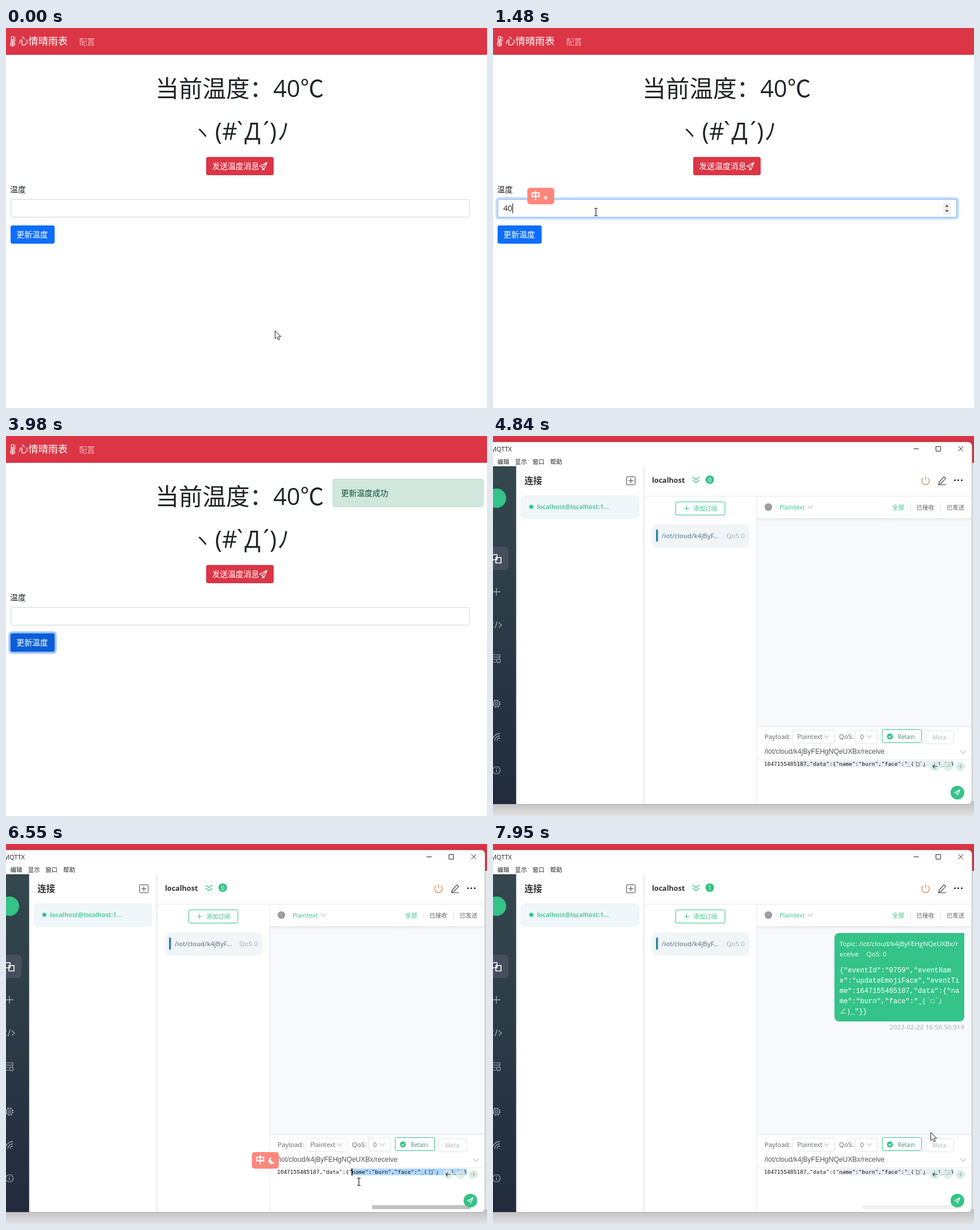
An HTML page that plays this animation: 841 px wide and 666 px high, repeating every 8 s.

```html
<!DOCTYPE html>
<html lang="zh-CN">
<head>
<meta charset="utf-8">
<style>
html, body { margin: 0; width: 100%; height: 100%; overflow: hidden; background: #fff; }
svg { display: block; width: 841px; height: 666px; }
text { font-family: 'Open Sans', 'Noto Sans CJK SC', 'Noto Sans CJK', sans-serif; white-space: pre; }
.mono { font-family: 'Liberation Mono', 'Noto Sans CJK SC', 'Noto Sans CJK', monospace; }
.code { font-family: 'DejaVu Sans Mono', 'Noto Sans CJK SC', 'Noto Sans CJK', monospace; }
.arial { font-family: 'Liberation Sans', sans-serif; }
</style>
</head>
<body>
<svg id="stage" viewBox="0 0 841 666"></svg>
<script>
const GREEN = '#34c388', INK = '#212529', LINE = '#e6e8f1';
const LOOP = 8000;

const text = (x, y, size, fill, str, extra = '') =>
  `<text x="${x}" y="${y}" font-size="${size}" fill="${fill}" ${extra}>${str}</text>`;
const mid = 'text-anchor="middle"', end = 'text-anchor="end"';
const rect = (x, y, w, h, fill, r = 0, extra = '') =>
  `<rect x="${x}" y="${y}" width="${w}" height="${h}" rx="${r}" fill="${fill}" ${extra}/>`;
const box = (x, y, w, h, stroke, r = 3, fill = '#fff') =>
  rect(x + .5, y + .5, w - 1, h - 1, fill, r, `stroke="${stroke}"`);
const dot = (x, y, r, fill, extra = '') =>
  `<circle cx="${x}" cy="${y}" r="${r}" fill="${fill}" ${extra}/>`;
const ring = (x, y, r, stroke, w, extra = '') =>
  dot(x, y, r, 'none', `stroke="${stroke}" stroke-width="${w}" ${extra}`);
const path = (d, stroke, w = 1, fill = 'none', extra = '') =>
  `<path d="${d}" stroke="${stroke}" stroke-width="${w}" fill="${fill}" ${extra}/>`;
const chevron = (x, y, stroke = '#b4b9c2') => path(`M${x - 4.5} ${y - 2.3}l4.5 4.6 4.5-4.6`, stroke, 1.1);
const group = (id, body) => `<g id="${id}">${body}</g>`;
const plane = (x, y, s, w, tail = '') => path('M12 0L0 6.3l4.600 1.700L6.800 12.300zM12 0L4.600 8' + tail,
  '#fff', w, 'none', `transform="translate(${x} ${y}) scale(${s})" stroke-linejoin="round"`);

function badge(id, mark) {
  return group(id, rect(0, 0, 47, 29, '#ff877c', 5) +
    text(6, 20, 17, '#fff', '中', 'font-weight="700"') + mark);
}

function webPage() {
  const face = [['(', 371.5], ['#', 391], ['`', 409], ['Д', 431], ['´', 455], [')', 467], ['ﾉ', 485]];
  return rect(0, 0, 841, 666, '#fff') +
    rect(0, 0, 841, 47, '#dc3545') +
    path('M9.2 25V17a2.3 2.3 0 0 1 4.6 0v8a3.8 3.8 0 1 1-4.6 0z', '#fff', 1.2) +
    path('M11.5 19v9', '#fff', 1.6) + dot(11.5, 28, 2, '#fff') + path('M15 16.5h2.5M15 19.5h2.5M15 22.5h2.5', '#fff') +
    text(22, 29, 17.2, '#fff', '心情晴雨表') +
    text(128, 28.5, 13.75, 'rgba(255,255,255,.6)', '配置') +
    text(261, 121, 41.25, INK, '当前温度：40℃') +
    text(343, 194, 31, INK, 'ヽ', mid) +
    face.map(([c, x]) => text(x, 196, 41.25, INK, c, mid)).join('') +
    rect(350, 226, 118, 32, '#dc3545', 3.4) +
    text(360.3, 246.5, 13.75, '#fff', '发送温度消息') + plane(443.5, 235.5, 1.08, 1, 'V12.500l1.500-2.200') +
    text(7, 287.5, 13.75, INK, '温度') +
    group('ring', rect(4.5, 296.5, 810, 39, '#c2dbfe', 6)) +
    box(8, 300, 803, 32, '#ced4da', 3.4) +
    group('focus', box(8, 300, 803, 32, '#86b7fe', 3.4) + rect(787, 306, 13, 20, '#efefef') +
      path('M790.5 313.5l3-4 3 4zM790.5 319l3 4 3-4z', 'none', 0, '#505050')) +
    `<text id="typed" x="18" y="321" font-size="13.75" fill="${INK}"></text>` +
    rect(19, 307.5, 1, 17, '#000', 0, 'id="caret"') +
    group('btnRing', rect(4.5, 342.5, 84, 39, '#98c1fe', 6)) +
    rect(8, 346, 77, 32, '#0d6efd', 3.4, 'id="btn"') +
    text(18.3, 366.5, 13.75, '#fff', '更新温度') +
    group('toast', box(571, 75, 264, 49.5, '#badbcc', 3.4, '#d1e7dd') +
      text(585.7, 104.5, 13.75, '#0f5132', '更新温度成功')) +
    badge('ime', ring(32, 17.5, 2.2, '#fff', 1.5));
}

function sidebar() {
  const c = '#a4abb3';
  return rect(0, 53, 40.5, 592, 'url(#side)') + dot(6, 109, 17, GREEN) + rect(-8, 194, 35, 41, '#474f5c', 6) +
    path('M-1 208h8v9h-8zM5 213h9v9.500h-9z', '#fff', 1.6) +
    path('M-1 273h14M6 266v14', c, 1.3) +
    path('M1 327l-5 4.500 5 4M10 327l5 4.500-5 4M7.500 325l-4 12', c, 1.3) +
    path('M5 396.500h-6v-13h13v6M-1 387.500h13M-1 391.500h6', c, 1.2) + ring(9.5, 394, 3.3, c, 1.2) +
    ring(6, 469, 6.4, c, 1.4, 'stroke-dasharray="2.800 2.226"') +
    ring(6, 469, 5.2, c, 1) + ring(6, 469, 2.2, c, 1.1) +
    path('M12 521.500a13 13 0 0 0-13 12.500M12 525.500a9 9 0 0 0-9 8.500M12 529.500a5 5 0 0 0-5 4.500', c, 1.3) +
    ring(6, 586, 6.5, c, 1.2) + path('M6 585v4.500M6 582v1.500', c, 1.3);
}

function message() {
  const lines = ['{"eventId":"0759","eventNam', 'e":"updateEmojiFace","eventTi',
    'me":1647155485187,"data":{"na', 'me":"burn","face":"_(´□`」', '∠)_"}}'];
  return path('M605 156H824V303a8 8 0 0 1-8 8H605a8 8 0 0 1-8-8V164a8 8 0 0 1 8-8z', 'none', 0, GREEN) +
    text(606, 178.5, 11.5, '#fff', 'Topic: /iot/cloud/k4jByFEHgNQeUXBx/r') +
    text(606, 196.5, 11.5, '#fff', 'eceive') + text(653, 196.5, 11.5, '#fff', 'QoS: 0') +
    lines.map((s, i) => text(606, 225 + 18 * i, 12.03, '#fff', s, 'class="mono"')).join('') +
    text(824, 325, 11.45, '#a2a9b0', '2023-02-22 16:56:50:919', end);
}

function client() {
  const grey = '#606266', dark = '#333';
  const menu = [['编辑', 7.5], ['显示', 38.5], ['窗口', 69], ['帮助', 100]];
  const round = (x, o) => dot(x, 579, 8.3, '#d5ebe2', `opacity="${o}"`);
  return rect(0, 10, 841, 37, '#d03343') + rect(837, 47, 4, 619, '#e4e4e4') +
    rect(0, 640, 841, 26, 'url(#floor)') + rect(0, 6, 841, 5, '#d03343') +
    rect(-12, 10.5, 849.5, 635, '#fff', 7, 'stroke="#8d8d8d" stroke-width=".6"') +
    text(-4, 26.5, 11, '#222', 'MQTTX') +
    path('M735.500 22.500h9M774.500 18.500h8v8h-8zM813.500 18l8.500 8.500M822 18l-8.500 8.500', '#222') +
    menu.map(([s, x]) => text(x, 48.5, 10.4, '#222', s)).join('') + sidebar() +
    // connections
    text(55, 84, 15.5, dark, '连接', 'font-weight="700"') +
    box(233, 71, 16, 15, '#444', 1) + path('M236.500 78.500h9M241 74v9', '#444', 1.1) +
    rect(48, 104, 208, 41, '#eff7fa', 6) + dot(67, 124, 3.6, GREEN) +
    text(77, 127.5, 11.1, GREEN, 'localhost@localhost:1...', 'font-weight="600"') +
    rect(260, 53, 5, 592, 'url(#edge)') +
    // header
    path('M265 105.500H837M461.500 105V645', LINE) +
    text(278, 81.5, 12.6, dark, 'localhost', 'font-weight="700"') +
    path('M349 72l6 4 6-4M349 77.500l6 4 6-4', GREEN, 1.5) + dot(379, 76.5, 7.6, GREEN) +
    `<text id="count" x="379" y="80.500" font-size="10.500" fill="#fff" ${mid}></text>` +
    path('M752.500 73a6.700 6.700 0 1 0 7.500 0M756.300 70.500v7.500', '#dd9152', 1.3) +
    path('M780 81l8.500-9.500 3 2.800-8.500 9.200-3.700.9zM778.500 85.500h13.500', '#444', 1.2) +
    [807.5, 813.5, 819.5].map(x => dot(x, 77.5, 1.6, '#333')).join('') +
    // subscriptions
    box(319, 115, 87, 24, GREEN, 2) + path('M334 127h9M338.500 122.500v9', GREEN) +
    text(350.3, 130.5, 10.4, GREEN, '添加订阅') +
    rect(278, 155, 170, 40.5, '#f0f5f8', 7) + rect(285, 164, 3.5, 21, '#3182ab', 1) +
    text(295, 178.5, 11.6, '#4e6a7c', '/iot/cloud/k4jByF...') + text(408, 178.5, 11.6, '#a2a9b0', 'QoS 0') +
    // messages
    rect(462, 145, 375, 363, '#f8f9fc') + rect(462, 144, 375, 5, 'url(#drop)') +
    dot(481.5, 124.5, 6.6, '#9a9da4') + text(481.5, 128, 9, '#b5b8bd', '?', mid) +
    text(501, 128.5, 10.9, GREEN, 'Plaintext') + chevron(555, 124.5) +
    text(698, 129, 10.4, GREEN, '全部') + text(740, 129, 10.4, grey, '已接收') + text(793, 129, 10.4, grey, '已发送') +
    path('M730.500 120v11M782.500 120v11', '#dcdfe6') +
    group('msg', message()) +
    // publish form
    path('M462 508.500H837', '#dddfe3') +
    text(475, 530.5, 11.5, grey, 'Payload:') + box(523, 515, 75, 24, '#e0e3e9') +
    text(532, 530.5, 10.8, grey, 'Plaintext') + chevron(583, 527) +
    text(605, 530.5, 11.5, grey, 'QoS:') + box(633, 515, 40, 24, '#e0e3e9') +
    text(642, 530.5, 10.8, grey, '0') + chevron(658, 527) +
    box(680, 514, 70, 24, GREEN, 2) + dot(694, 526.5, 5.2, GREEN) + path('M691.500 526.500l2 2 3.300-3.600', '#fff', 1.2) +
    text(708, 530.5, 10, '#3f8f72', 'Retain') +
    box(755, 516, 51, 24, '#e0e3e9', 2) + text(780.5, 531.5, 10, '#c0c4cc', 'Meta', mid + ' font-weight="600"') +
    text(475, 557, 12.05, '#555', '/iot/cloud/k4jByFEHgNQeUXBx/receive', 'class="arial"') +
    chevron(822, 554) + path('M462 567.500H837', LINE) +
    // editor
    rect(531, 569, 275, 11.5, '#e5ebf1', 0, 'id="sel"') +
    text(474, 577.5, 9.47, '#111', '1647155485187,"data":{"name":"burn","face":"_(´', 'class="code"') +
    text(740, 577.5, 9.47, '#111', '□`」', 'class="code"') +
    text(806, 577.5, 9.47, '#111', ')_"}}', 'class="code" ' + end) +
    round(773, .85) + round(795, .8) + round(817, .8) +
    path('M777 579h-8M772.500 575.500l-3.500 3.500 3.500 3.500', '#333', 1.1) +
    path('M791.500 579h7M813 579h7M816.500 575.500l3.500 3.500-3.500 3.500', '#a3b8ae', 1.1) +
    rect(604, 568.5, 1.6, 12.5, '#000', 0, 'id="edCaret"') +
    rect(640, 633, 172, 7, '#c1c1c1', 0, 'id="bar"') +
    dot(812, 625, 12, GREEN) + plane(806.8, 619.8, .82, 1.25) +
    badge('ime2', path('M34 9.500a5.600 5.600 0 1 0 5.500 8a5.200 5.200 0 0 1-5.500-8z', 'none', 0, '#fff'));
}

const cursors =
  group('arrow', path('M.5.5V14.8l3.300-3.100 2.400 5 2.300-1-2.300-4.900h4.500z', '#222', 1, '#fff')) +
  group('beam', path('M-3-6.500h2.300l.7.700.7-.7H3M0-6V6M-3 6.500h2.300l.7-.7.700.7H3', '#222', 1.2)) +
  group('hand', path('M1 1.800a1.500 1.500 0 0 1 3 0V7l1.800.300 1.800.500 1.800.600c1.300.400 1.600 1 1.600 2.200 0 3-1 4-1.300 5.500V18H3.500v-1.600C2 14.500-1 11.500-2.500 9.800c-.8-1.400.8-2.300 1.900-1.400L1 10z', '#222', 1, '#fff') +
    path('M4 7v3M6.700 7.800v2.500M9.300 8.600v2', '#222', .8));

const grad = (id, a, b, dir) => `<linearGradient id="${id}" x2="${dir ? 0 : 1}" y2="${dir ? 1 : 0}">` +
  `<stop stop-color="${a}"/><stop offset="1" stop-color="${b}"/></linearGradient>`;

document.getElementById('stage').innerHTML =
  '<defs>' + grad('side', '#34484e', '#212b3c', 1) + grad('floor', '#bdbdbd', '#e1e1e1', 1) +
  grad('edge', '#fff', '#e9ebef', 0) + grad('drop', '#e6e8ec', '#f8f9fc', 1) + '</defs>' +
  group('page', webPage()) + group('client', client()) + group('cursor', cursors);

const el = {};
document.querySelectorAll('[id]').forEach(n => el[n.id] = n);
const show = (id, on) => el[id].setAttribute('display', on ? 'inline' : 'none');
const move = (id, x, y) => el[id].setAttribute('transform', `translate(${x} ${y})`);
const within = (t, a, b) => t >= a && t < b;

// time, x, y of the pointer hot spot
const track = [
  [0, 470, 530], [70, 470, 530], [640, 180, 322.5], [2110, 180, 322.5], [2480, 67, 371],
  [3120, 67, 371], [3260, 180, 346], [3590, 598, 453], [3820, 598, 453], [3970, 744, 662],
  [5240, 822, 648], [5780, 556, 427], [5940, 556, 427], [6230, 806, 576], [6300, 806, 576],
  [6530, 617, 592], [6790, 617, 592], [7230, 811, 621], [7800, 811, 621], [7940, 765, 505], [LOOP, 765, 505]
];

function pointer(t) {
  const i = Math.max(1, track.findIndex(k => k[0] > t));
  const [t0, x0, y0] = track[i - 1], [t1, x1, y1] = track[i];
  const u = (t - t0) / (t1 - t0), e = u * u * (3 - 2 * u);
  return [x0 + (x1 - x0) * e, y0 + (y1 - y0) * e];
}

function pointerKind(x, y, inClient) {
  if (inClient) {
    if (Math.hypot(x - 812, y - 625) < 12) return 'hand';
    return x > 462 && y > 545 && y < 645 ? 'beam' : 'arrow';
  }
  if (within(x, 8, 85) && within(y, 346, 378)) return 'hand';
  return within(x, 8, 811) && within(y, 300, 332) ? 'beam' : 'arrow';
}

function draw(t) {
  const inClient = t >= 4840;
  const [x, y] = pointer(t);
  const kind = pointerKind(x, y, inClient);
  show('client', inClient);
  show('cursor', !within(t, 3965, 5240));
  move('cursor', x, y);
  ['arrow', 'beam', 'hand'].forEach(k => show(k, k === kind));

  // form
  const focused = within(t, 660, 2560), value = within(t, 1330, 2560) ? (t < 1430 ? '4' : '40') : '';
  const caretX = 19 + 8 * value.length - (value ? 1 : 0);
  show('ring', focused);
  show('focus', focused);
  el.typed.textContent = value;
  show('caret', within(t, 660, 1160) || within(t, 1330, 1940) || within(t, 2440, 2560));
  el.caret.setAttribute('x', caretX);
  show('ime', focused);
  move('ime', caretX + 26, 280);
  show('btnRing', t >= 2560);
  el.btn.setAttribute('fill', t >= 2560 || kind === 'hand' ? '#0b5ed7' : '#0d6efd');
  show('toast', t >= 2680);

  // message client
  const pressed = t >= 6250, active = within(t, 6250, 7400), sent = t >= 7420;
  const cell = 474 + 5.7 * Math.max(23, Math.round((x - 474) / 5.7));
  const start = !pressed ? 531 : t >= 6530 ? 605 : Math.min(806, cell);
  el.sel.setAttribute('x', start);
  el.sel.setAttribute('width', Math.max(0, 806 - start));
  el.sel.setAttribute('fill', active ? '#add6ff' : '#e5ebf1');
  show('edCaret', active);
  el.edCaret.setAttribute('x', start - 1);
  show('ime2', within(t, 6250, 6860));
  move('ime2', t < 6450 ? 282 : 430, 540);
  show('bar', t >= 6200);
  el.bar.setAttribute('x', t < 7800 ? 640 : 646);
  el.bar.setAttribute('width', t < 7800 ? 172 : 166);
  el.bar.setAttribute('opacity', t < 7800 ? 1 : Math.max(.22, 1 - (t - 7800) / 180));
  show('msg', sent);
  el.count.textContent = sent ? 1 : 0;
}

const began = performance.now();
function tick() {
  draw((performance.now() - began) % LOOP);
  requestAnimationFrame(tick);
}
tick();
</script>
</body>
</html>
```
